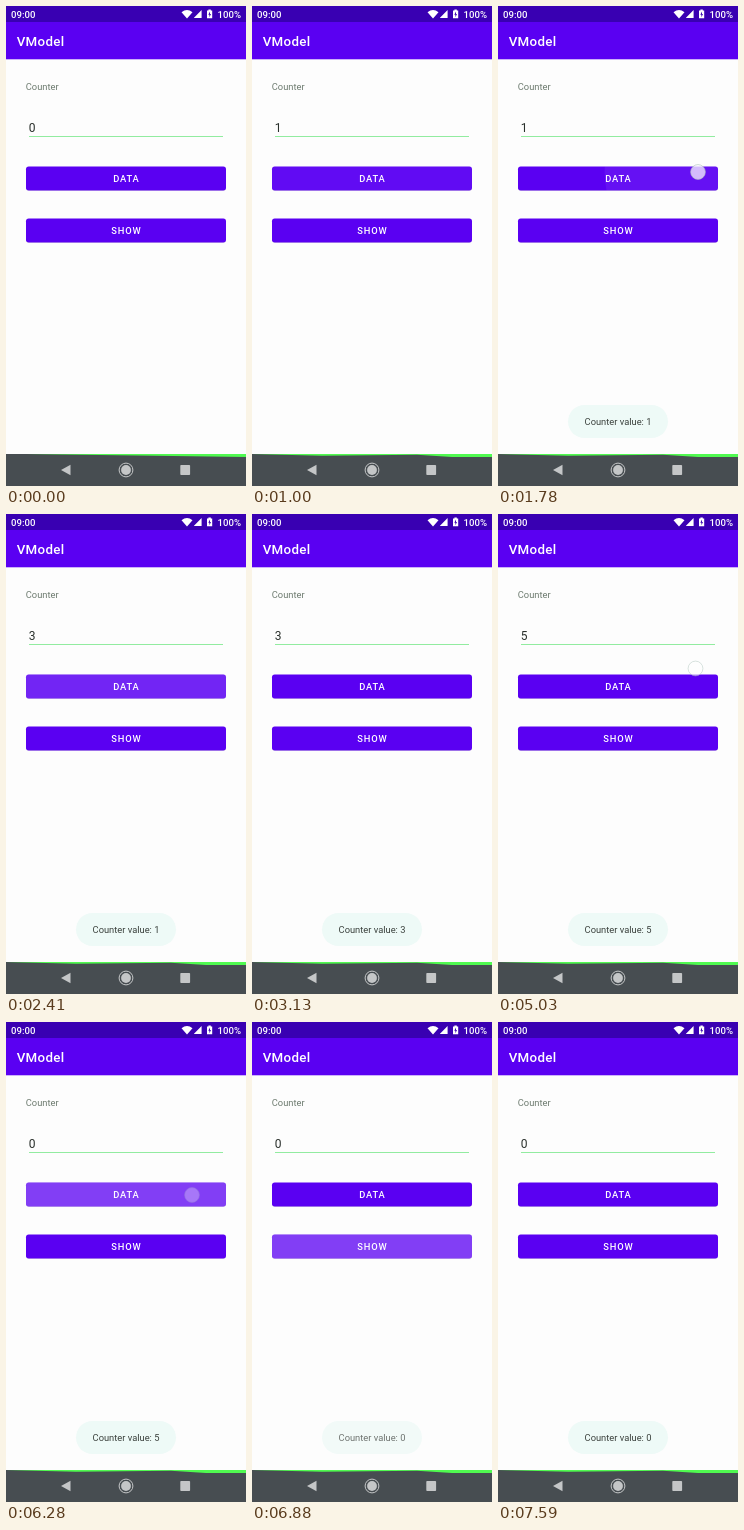
Animation, 240 px wide and 480 px high, one loop 7.62 s. Source, as an HTML page:

```html
<!DOCTYPE html>
<html lang="en">
<head>
<meta charset="utf-8">
<title>Counter</title>
<style>
  html, body { margin: 0; width: 100%; height: 100%; overflow: hidden; background: #fdfdfd; }
  svg { display: block; width: 240px; height: 480px; font: 9.33px Roboto, sans-serif; }
  .medium { font-weight: 500; fill: #fff; }
  .label { letter-spacing: .83px; text-anchor: middle; }
  .button { fill: #5a00f2; }
</style>
</head>
<body>
<svg viewBox="0 0 240 480">
  <defs>
    <clipPath id="dataClip"><rect x="20" y="160.5" width="200" height="24" rx="2.7"/></clipPath>
    <clipPath id="showClip"><rect x="20" y="212.5" width="200" height="24" rx="2.7"/></clipPath>
  </defs>
  <rect width="240" height="480" fill="#fdfdfd"/>

  <rect y="15" width="240" height="38.3" fill="#5a00f2"/>
  <rect width="240" height="16" fill="#3900b2"/>
  <g class="medium">
    <text x="5" y="11.7" font-size="9.6">09:00</text>
    <text x="235" y="11.7" font-size="9.6" text-anchor="end">100%</text>
    <path d="M175.5 6.2Q181 1.8 186.5 6.2L181 12.5ZM188 12V11.8L195.6 4V12ZM201 4.5H202.4V3.5H204.8V4.5H206.2V12.3H201Z"/>
    <path d="M204 5.5L202.3 8.7H203.4V11.2L205 7.9H204Z" fill="#3900b2"/>
    <text x="10.7" y="39.7" font-size="13.33" letter-spacing=".3">VModel</text>
  </g>

  <text x="19.8" y="83.6" fill="#6c7a6e">Counter</text>
  <text id="count" x="22.7" y="126" font-size="12" fill="#2a302c"></text>
  <path d="M23 130.5H217" stroke="#92eca0"/>

  <g fill="#000" opacity=".1">
    <rect x="20" y="161.5" width="200" height="23.5" rx="3"/>
    <rect x="20" y="213.5" width="200" height="23.5" rx="3"/>
  </g>
  <rect class="button" x="20" y="160.5" width="200" height="24" rx="2.7"/>
  <rect class="button" x="20" y="212.5" width="200" height="24" rx="2.7"/>
  <g clip-path="url(#dataClip)"><circle id="dataRipple" fill="#fff"/></g>
  <g clip-path="url(#showClip)"><circle id="showRipple" fill="#fff"/></g>
  <text class="medium label" x="120.4" y="176.2">DATA</text>
  <text class="medium label" x="120.4" y="228.2">SHOW</text>

  <g id="toast">
    <rect x="70" y="399" width="100" height="33" rx="16.5" fill="#eefaf7"/>
    <text id="message" x="120" y="419.3" text-anchor="middle" fill="#3a403c"></text>
  </g>

  <rect y="448" width="240" height="32" fill="#474d51"/>
  <path id="edge" fill="#50fa50"/>
  <g fill="#c4c6c7">
    <path d="M55 464L64.5 458.8V469.2Z"/>
    <circle cx="120" cy="464" r="4.9"/>
    <circle cx="120" cy="464" r="6.9" fill="none" stroke="#c4c6c7"/>
    <rect x="174.3" y="459" width="9.8" height="10" rx=".8"/>
  </g>

  <circle id="dot" r="7.4" fill="#fff" fill-opacity=".72" stroke="#a8c0b8" stroke-opacity=".6"/>
</svg>
<script>
const LOOP = 7620;
const $ = id => document.getElementById(id);
const clamp = v => Math.min(1, Math.max(0, v));

// [pressed button, down, up, x, y]; the tap without a button misses
const taps = [
  ['data', 530, 620, 200, 168],
  ['show', 1180, 1280, 194, 226],
  ['data', 1720, 1820, 200, 166],
  ['data', 2060, 2160, 200, 167],
  ['show', 2500, 2600, 192, 226],
  ['data', 3170, 3260, 198, 168],
  ['data', 3425, 3520, 198, 168],
  ['show', 4230, 4330, 192, 225],
  ['', 4880, 5000, 197.5, 154.5],
  ['data', 6050, 6210, 186, 173],
  ['show', 6650, 6750, 190, 226],
];

function place(circle, x, y, opacity) {
  circle.setAttribute('cx', x);
  circle.setAttribute('cy', y);
  circle.setAttribute('opacity', opacity);
}

function draw(t) {
  let count = 0, shown = 0, shownAt = Infinity;
  for (const id of ['dot', 'dataRipple', 'showRipple']) place($(id), 0, 0, 0);

  for (const [button, down, up, x, y] of taps) {
    if (t < down) break;
    place($('dot'), x, y, 1 - clamp((t - up) / 120));
    if (!button) continue;

    const grow = clamp((t - down) / 225);
    const fade = 1 - clamp((t - Math.max(up, down + 225)) / 300);
    const ripple = $(button + 'Ripple');
    ripple.setAttribute('r', 50 + 160 * grow);
    place(ripple, x, y, .25 * grow * fade);

    if (t < up) continue;
    if (button === 'data') count = (count + 1) % 6;
    else [shown, shownAt] = [count, up];
  }

  $('count').textContent = count;
  $('message').textContent = 'Counter value: ' + shown;
  $('toast').setAttribute('opacity', clamp((t - shownAt) / 180));
  $('edge').setAttribute('d', t < 530
    ? 'M20 448H240V451Z'
    : 'M0 448H240V451H200L165 448.7L70 449.7Z');
}

function tick() {
  draw(performance.now() % LOOP);
  requestAnimationFrame(tick);
}
tick();
</script>
</body>
</html>
```
